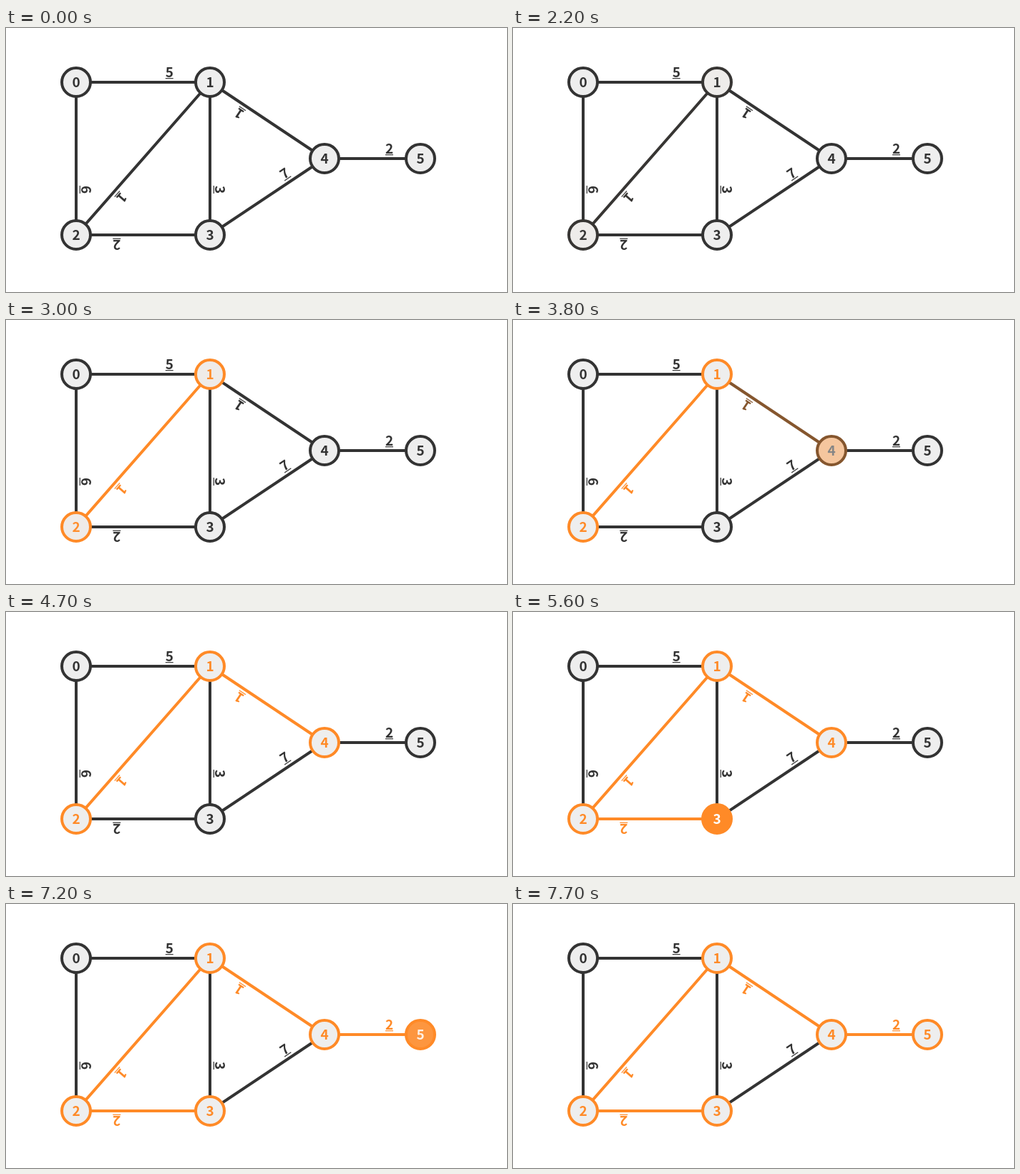
Write an HTML page that moves like this. It is 700 px wide and 370 px high and loops after 8 s.

```html
<!DOCTYPE html>
<html lang="en">
<head>
<meta charset="utf-8">
<title>Minimum spanning tree</title>
<style>
  html, body { margin: 0; width: 100%; height: 100%; overflow: hidden; background: #fff; }
  svg { display: block; width: 100%; height: 100%; }
  text {
    font: 700 19px "Noto Sans CJK JP", "Noto Sans CJK SC", "Open Sans", sans-serif;
    text-anchor: middle;
  }
</style>
</head>
<body>
<svg id="stage" viewBox="0 0 700 370"></svg>
<script>
const LOOP = 8000, STEP = 100, FADE = 400;
const DARK = [51, 51, 51], PALE = [238, 238, 238], WHITE = [255, 255, 255], ORANGE = [255, 138, 39];

const nodes = [[98, 76], [285, 76], [98, 290], [285, 290], [445, 183], [579, 183]];
// from, to, weight
const edges = [[0, 1, 5], [0, 2, 6], [1, 2, 1], [1, 3, 3], [3, 2, 2], [4, 1, 1], [3, 4, 7], [4, 5, 2]];
// each visit: highlight the edge and its new nodes, then settle the nodes to an outline
const visits = [
  { edge: 2, nodes: [1, 2], start: 2133, settle: 2680 },
  { edge: 5, nodes: [4], start: 3614, settle: 4114 },
  { edge: 4, nodes: [3], start: 5090, settle: 5590 },
  { edge: 7, nodes: [5], start: 6576, settle: 7076 }
];

const stage = document.getElementById("stage");

function add(parent, tag, attrs, text) {
  const el = document.createElementNS("http://www.w3.org/2000/svg", tag);
  for (const key in attrs) el.setAttribute(key, attrs[key]);
  if (text !== undefined) el.textContent = text;
  parent.appendChild(el);
  return el;
}

function ease(t, start) {
  const u = Math.min(1, Math.max(0, (t - start) / FADE));
  return u < 0.5 ? 4 * u ** 3 : 1 - 4 * (1 - u) ** 3;
}

const mix = (a, b, k) => a.map((v, i) => v + (b[i] - v) * k);
const rgb = c => `rgb(${c.map(Math.round)})`;

const edgeViews = edges.map(([from, to, weight]) => {
  const [x1, y1] = nodes[from], [x2, y2] = nodes[to];
  const length = Math.hypot(x2 - x1, y2 - y1);
  const angle = Math.atan2(y2 - y1, x2 - x1) * 180 / Math.PI;
  const g = add(stage, "g", { transform: `translate(${x1} ${y1}) rotate(${angle})` });
  const mid = 0.75 * length - 10;
  add(g, "path", { d: `M0 0H${length}`, "stroke-width": 4 });
  add(g, "text", { x: mid, y: -7, stroke: "none" }, weight);
  add(g, "path", { d: `M${mid - 5.5} -5.3h11`, "stroke-width": 1.2 });
  return g;
});

const nodeViews = nodes.map(([x, y], i) => ({
  circle: add(stage, "circle", { cx: x, cy: y, r: 20, "stroke-width": 4 }),
  label: add(stage, "text", { x, y: y + 7 }, i)
}));

function paintEdge(i, color) {
  edgeViews[i].setAttribute("stroke", rgb(color));
  edgeViews[i].setAttribute("fill", rgb(color));
}

function paintNode(i, fill, stroke, text) {
  const { circle, label } = nodeViews[i];
  circle.setAttribute("fill", rgb(fill));
  circle.setAttribute("stroke", rgb(stroke));
  label.setAttribute("fill", rgb(text));
}

function draw(t) {
  edges.forEach((_, i) => paintEdge(i, DARK));
  nodes.forEach((_, i) => paintNode(i, PALE, DARK, DARK));
  for (const v of visits) {
    const a = ease(t, v.start), b = ease(t, v.settle);
    const line = mix(DARK, ORANGE, a);
    const fill = mix(mix(PALE, ORANGE, a), PALE, b);
    const text = mix(mix(DARK, WHITE, a), ORANGE, b);
    paintEdge(v.edge, line);
    v.nodes.forEach(i => paintNode(i, fill, line, text));
  }
}

const origin = performance.now();
function tick() {
  const t = (performance.now() - origin) % LOOP;
  draw(Math.floor(t / STEP) * STEP);
  requestAnimationFrame(tick);
}
tick();
</script>
</body>
</html>
```
